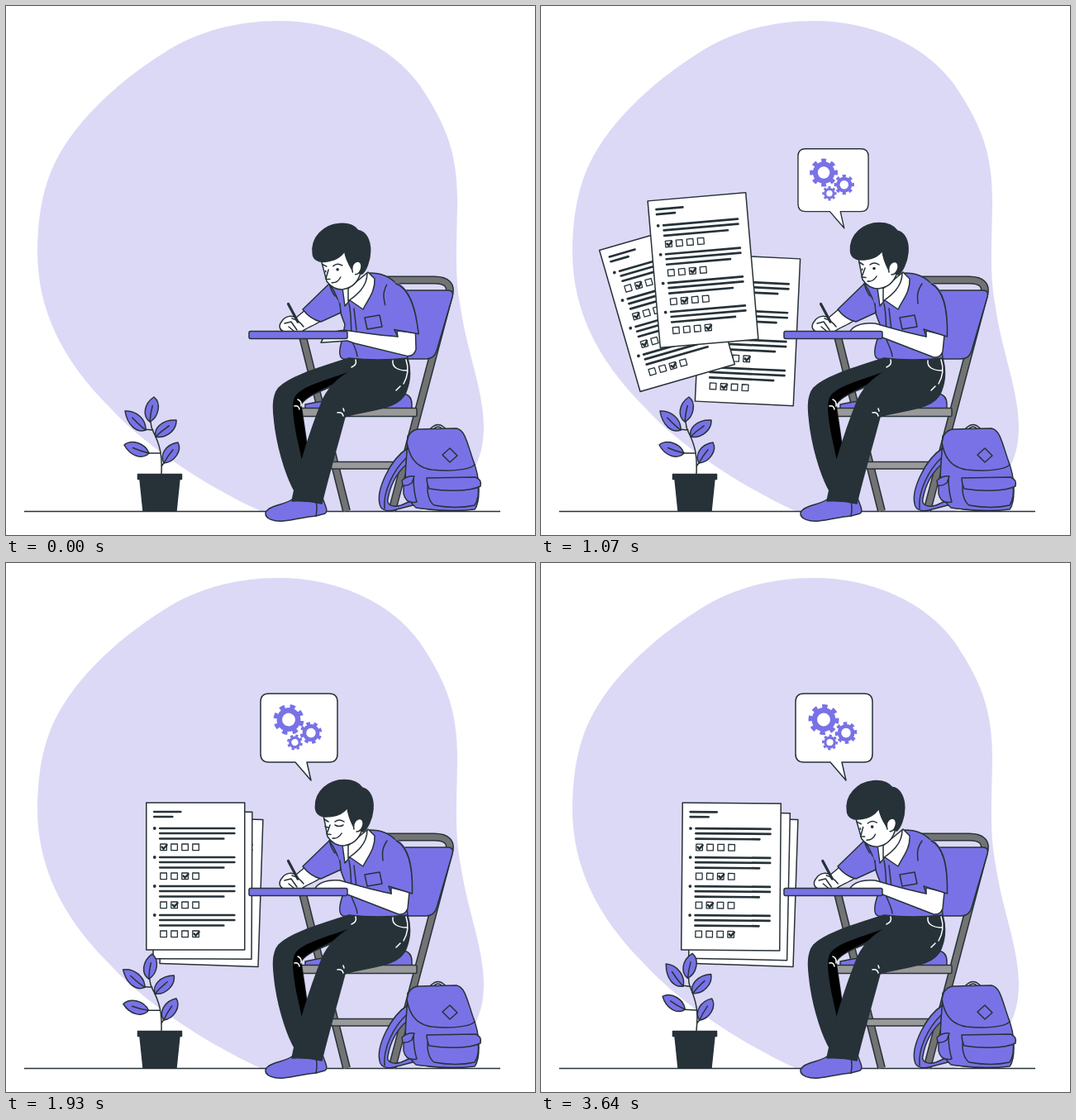
Write an HTML page that moves like this. It is 640 px wide and 640 px high and loops after 3710 ms.

```html
<!DOCTYPE html>
<html lang="en">
<head>
<meta charset="utf-8">
<title>Student at a desk</title>
<style>
  html, body { margin: 0; width: 100%; height: 100%; overflow: hidden; background: #fff; }
  svg { display: block; width: 100vw; height: 100vh; }
  .line { fill: none; }
  .ink { fill: #263238; }
  .main { fill: #7972e6; }
  .white { fill: #fff; }
  .bar { fill: #999; }
  .flat { stroke: none; }
</style>
</head>
<body>
<svg viewBox="0 0 640 640" stroke="#263238" stroke-width="1.5" stroke-linecap="round" stroke-linejoin="round">
  <path class="flat" fill="#dcd9f6" d="M330 18C400 18 465 47 500 95C530 140 547 175 546 240C545 300 543 330 550 365C558 420 578 465 578 510C578 560 550 595 500 611H308C250 585 170 535 125 485C70 430 38 370 38 297C38 255 45 220 58 192C85 135 145 84 200 51C240 28 285 18 330 18Z"/>
  <path stroke-linecap="butt" d="M22 611.5H598"/>
  <g id="papers"></g>

  <g id="chair">
    <g class="line" stroke-linecap="butt">
      <path stroke-width="10" d="M359 400L412 611M455 331.5H518Q541 331.5 536 350L467 611"/>
      <path stroke="#737373" stroke-width="7" d="M359 400L412 611M455 331.5H518Q541 331.5 536 350L467 611"/>
    </g>
    <path class="bar" d="M392 551.500H478L476 560H394Z"/>
    <path class="main" d="M440 344H535Q542 344 540 352L521 417Q518 427 508 427H440Z"/>
    <path class="main" d="M362 490V482C400 474 455 469 480 469Q491 470 491 482V490Z"/>
    <rect class="bar" x="357" y="486.500" width="140" height="10" rx="1.500"/>
  </g>

  <path class="main" d="M391 336L412 342L440 323C455 323 465 328 472 336C488 350 486 380 484 400L486 428C460 431 430 429 408 427C402 425 403 415 407 403L410 385C404 372 400 352 391 336Z"/>
  <path class="line" d="M415 360C418 375 417 385 418 395C415 405 424 412 425 424M421 366L424 392M434 377L452 374L455 388L437 391Z"/>

  <path class="main" d="M346 597C336 604 318 604 314 613C313 621 325 624 336 623C350 622 360 618 375 617L386 614Q389 612 387 606L381 590Z"/>
  <path class="line" d="M375 598Q377 608 375 617"/>
  <g class="ink">
    <path d="M415 426C385 436 345 447 330 462C320 474 324 495 326 512C331 545 342 575 350 588L375 590L364 530L357 482C365 468 400 460 430 445Z"/>
    <path class="flat" fill="#000" d="M419 441C390 452 355 460 349 474C345 484 348 500 351 518L358 550L364 530L357 482C364 468 400 460 419 441Z"/>
    <path d="M420 440C398 452 386 468 381 482C370 510 358 545 349 585L346 599Q364 598 382 602C388 575 400 535 410 497C435 488 475 490 484 467C490 452 490 440 486 426Q450 430 415 426Z"/>
  </g>
  <path class="line" stroke="#fff" d="M468 429C467 437 474 441 485 441M484 428Q489 443 481 457M477 460L472 465M423 428Q425 434 418 437M349 484Q354 483 355 488M353 476Q358 478 357 484M401 492Q407 491 408 496M408 487L409 490"/>

  <g id="pen">
    <path class="white" d="M363 367L351 377C345 374 338 375 334 381C329 387 331 392 336 394H358C362 390 372 387 381 381Z"/>
    <path stroke-width="3.200" d="M341.500 360.500L353 382"/>
    <path class="line" d="M337 384L345 382L352 392M342 388L348 393M346 378Q354 380 360 388"/>
  </g>
  <path class="main" d="M391 336L359 367Q368 379 381 382L405 371C403 355 398 345 391 336Z"/>
  <path class="line" stroke="#7972e6" stroke-width="3" d="M400 356L404 368"/>
  <path class="line" d="M391 336Q394 346 398 351M405 371L404 360"/>
  <path class="white" d="M407 341L410 363L416 356L432 367C438 355 447 345 446 330L438 322L415 341Z"/>
  <path class="line" d="M414 341V357C424 350 437 340 437 323"/>

  <g id="head">
    <path class="white" d="M384 305L389 331C393 337 400 342 408 342C418 341 427 335 431 322L425 295H386Z"/>
    <path class="ink" d="M374.500 297C373 276 391 262.500 409 262.500C420 262.500 427 266 431 272C441 274 445 286 444 298C443 310 437 322 432 325L421 320C418 314 414 307 413 296C408 303 399 307 387 307C380 307 375 303 374.500 297Z"/>
    <path class="white" d="M421 322C419 312 427 307 431 311C434 316 430 325 424 325"/>
    <path class="line" d="M392 317L388 328L393 328.500M395 333Q402 334 406 327M398 313Q403 309 409 313M385 310L390 313"/>
    <g id="open"><circle class="ink flat" cx="403" cy="317.500" r="1.800"/><path d="M388.500 318V319.500"/></g>
    <path id="closed" class="line" d="M398 317Q403 320 408 317M386 319L390 320"/>
  </g>

  <g id="arm">
    <path class="white" d="M373 395C378 386 390 383 404 384C425 390 445 396 466 400V393L488 398L486 418Q483 426 475 425L413 401L405 397Z"/>
    <path class="main flat" d="M458 346C462 334 472 332 478 338C490 350 492 375 491.500 400L463 392C457 375 454 360 458 346Z"/>
    <path class="line" d="M461 336C455 345 455 350 456 360M472 336C490 345 492 375 491.500 400L463 391L466 400"/>
  </g>
  <rect class="main" x="294" y="393.500" width="119" height="9" rx="2"/>

  <g id="bag" class="main">
    <path d="M486 535C465 548 448 585 452 602C453 612 465 612 473 609L496 603L494 597L478 604C468 607 460 604 462 596C465 580 473 565 484 555Z"/>
    <path class="line" d="M485 546C468 562 456 588 458 608"/>
    <path class="line" d="M513 512Q523 501 532 512M517 512Q523 506 528 512"/>
    <path d="M486 520C485 560 476 590 496 607Q535 613 567 609C574 600 574 570 565 550Z"/>
    <path d="M487 520Q492 511 502 512L545 511C556 513 558 530 567 555C560 562 535 563 515 561C495 558 488 545 485 528Z"/>
    <path d="M537 535L546 544L537 552L528 543Z"/>
    <path d="M511 575C508 588 512 600 518 604Q545 609 567 604Q573 595 571 580Z"/>
    <path d="M509 571L568 570Q576 573 574 581C560 588 530 587 512 584Q509 578 509 571Z"/>
    <path d="M481 578L493 570Q493 588 497 600Q484 603 481 590Z"/>
    <path d="M479 574Q486 568 494 569L491 577Q486 581 480 580Z"/>
  </g>

  <g id="plant"></g>
  <path class="ink" d="M159.500 566.500H212.500V572.500H210L206 611H166L162 572.500H159.500Z"/>

  <g id="bubble">
    <path class="white" d="M318 158H391Q401 158 401 168V231Q401 241 391 241H364L369 263L350 241H318Q308 241 308 231V168Q308 158 318 158Z"/>
  </g>
</svg>
<script>
const LOOP = 3710, STEP = LOOP / 52;
const $ = id => document.getElementById(id);

function add(parent, tag, attrs = {}) {
  const el = document.createElementNS('http://www.w3.org/2000/svg', tag);
  for (const name in attrs) el.setAttribute(name, attrs[name]);
  return parent.appendChild(el);
}
const place = (el, transform) => el.setAttribute('transform', transform);

// Smooth monotone curve through the given times and values, clamped at both ends.
function curve(t, times, values) {
  const last = times.length - 1;
  if (t <= times[0]) return values[0];
  if (t >= times[last]) return values[last];
  const slope = i => (values[i + 1] - values[i]) / (times[i + 1] - times[i]);
  const tangent = i => {
    if (i === 0 || i === last) return 0;
    const a = slope(i - 1), b = slope(i);
    return a * b > 0 ? 2 * a * b / (a + b) : 0;
  };
  const i = times.findIndex(time => time > t) - 1;
  const span = times[i + 1] - times[i], p = (t - times[i]) / span, q = 1 - p;
  return values[i] * (1 + 2 * p) * q * q + values[i + 1] * p * p * (3 - 2 * p)
    + span * p * q * (tangent(i) * q - tangent(i + 1) * p);
}

// Exam sheets, back to front; each track follows the times in sheetTimes.
const sheetTimes = [500, 570, 1070, 1430, 1930, 2430];
const sheets = [
  { checks: [0, 2, 3, 1], x: [250, 250, 250, 249.5, 248.5, 248.5],
    y: [258, 257.5, 392, 398, 397.5, 397.5], turn: [2.8, 2.8, 2.7, 2.5, 1.9, 1.9] },
  { checks: [1, 0, 0, 2], x: [158.4, 157.5, 152.5, 178.5, 238, 240],
    y: [271, 270, 364.5, 383, 390, 390.5], turn: [-30.3, -30, -16.1, -11.3, 0.3, 1.2] },
  { checks: [0, 2, 1, 3], x: [202.5, 203, 196, 206, 229.3, 230],
    y: [251.5, 250.5, 319.5, 344.5, 379, 379.5], turn: [6.3, 5.8, -4.9, -4.1, 0, 0.5] }
];
for (const sheet of sheets) {
  const g = sheet.el = add($('papers'), 'g');
  add(g, 'rect', { class: 'white', x: -59.5, y: -89, width: 119, height: 178 });
  let text = 'M-50-78h32M-50-72h22', boxes = '', ticks = '';
  sheet.checks.forEach((check, row) => {
    const y = -58 + row * 35;
    text += `M-43 ${y}h90m-90 6h90m-90 6.5h77`;
    add(g, 'circle', { class: 'ink flat', cx: -49.5, cy: y, r: 1.9 });
    for (let i = 0; i < 4; i++) boxes += `M${-42.5 + i * 13} ${y + 19}h7.6v7.6h-7.6z`;
    ticks += `M${-40.7 + check * 13} ${y + 22.5}l2 2.3l4-4.5`;
  });
  add(g, 'path', { class: 'line', d: text, 'stroke-width': 2.7 });
  add(g, 'path', { class: 'line', d: boxes, 'stroke-width': 1.3 });
  add(g, 'path', { class: 'line', d: ticks, 'stroke-width': 2.5 });
}

// Leaves: base point, tip point.
const plant = $('plant');
add(plant, 'path', { class: 'line', d: 'M188 566C189 545 187 535 181 521C176 511 175 508 175 500M178 513L166 512M181 521L186 517M187 541L172 541M188 557L193 550' });
const leaves = [
  [174, 503, 179, 473], [169, 513, 144, 490], [181, 521, 206, 501],
  [173, 541, 143, 531], [191, 553, 208, 528]
].map(([x, y, tipX, tipY]) => {
  const length = Math.hypot(tipX - x, tipY - y);
  const el = add(plant, 'g');
  add(el, 'path', { class: 'main', d: `M0 0C5-10 20-11 ${length} 0C25 10 8 10 0 0Z` });
  add(el, 'path', { class: 'line', d: `M0 0Q10-1 ${length * 0.65} 0` });
  return { el, x, y, angle: Math.atan2(tipY - y, tipX - x) * 180 / Math.PI, lean: (tipX - x) / length };
});

const gears = [[342, 189.5, 18.5, 1], [369, 205.5, 13.3, -1], [349.5, 217, 9.5, 1]].map(([x, y, r, spin]) => {
  const el = add($('bubble'), 'g', { class: 'flat' });
  add(el, 'circle', { class: 'main', r: r * 0.78 });
  add(el, 'circle', { class: 'line', r: r * 0.86, stroke: '#7972e6', 'stroke-width': r * 0.28,
    pathLength: 16, 'stroke-dasharray': '1 1', 'stroke-linecap': 'butt', transform: 'rotate(-11.25)' });
  add(el, 'circle', { class: 'white', r: r * 0.43 });
  return { el, x, y, spin };
});

function draw(t) {
  const grow = curve(t, [70, 470], [0, 1]);
  for (const { el, x, y, turn } of sheets) {
    const [cx, cy, angle] = [x, y, turn].map(track => curve(t, sheetTimes, track));
    place(el, `translate(${cx} ${cy}) rotate(${angle}) scale(${grow})`);
  }
  $('papers').style.display = grow ? '' : 'none';

  const pop = curve(t, [640, 1215, 1430], [0, 1.087, 1]);
  $('bubble').style.display = pop ? '' : 'none';
  place($('bubble'), `translate(343 331) scale(${pop}) translate(-343 -331)`);
  for (const { el, x, y, spin } of gears)
    place(el, `translate(${x} ${y}) rotate(${spin * (t - 1070) * 0.072})`);

  place($('head'), `rotate(${curve(t, [0, 500, 1950, 2430, 3640], [-4, 0, 0, -4, -5])} 420 345)`);
  place($('arm'), `rotate(${curve(t, [0, 500, 1070], [-7.5, -1.5, 0])} 470 340)`);
  place($('pen'), `translate(${1.5 * Math.cos(2 * Math.PI * t / 240) - 1.5} 0)`);
  const blink = t > 1850 && t < 2000;
  $('open').style.display = blink ? 'none' : '';
  $('closed').style.display = blink ? '' : 'none';

  const sway = curve(t, [0, 500, 1070, 1430, 1930, 2430, 3000, 3640], [0, 1, 0, -1, -0.35, 0, -0.1, 1]);
  place(plant, `rotate(${sway * 3.2} 188 566)`);
  for (const { el, x, y, angle, lean } of leaves)
    place(el, `translate(${x} ${y}) rotate(${angle - lean * (lean < 0 ? 9 * sway : 14 * Math.abs(sway))})`);
}

const start = performance.now();
function tick() {
  const t = (performance.now() - start) % LOOP;
  // Pictures are held for one step; step times are rounded to tens, hence the small lead.
  draw(Math.floor((t + 6) / STEP) * STEP % LOOP);
  requestAnimationFrame(tick);
}
tick();
</script>
</body>
</html>
```
